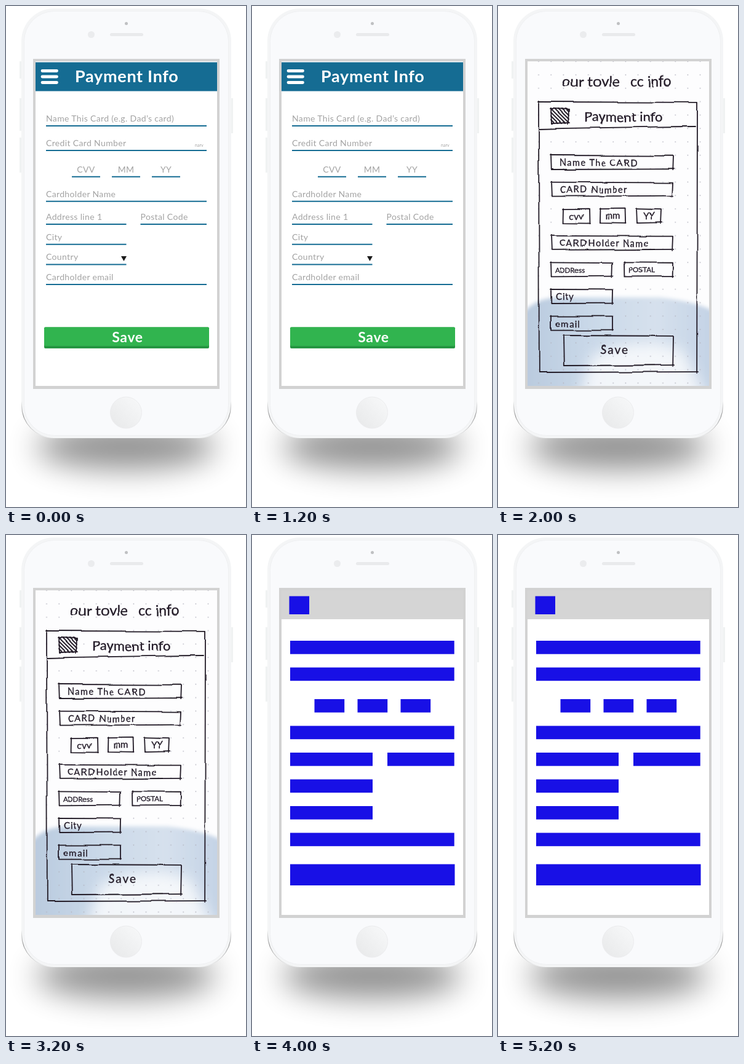
An HTML page that plays this animation: 390x815 px, repeating every 6000 ms.

```html
<!DOCTYPE html>
<html lang="en">
<head>
<meta charset="utf-8">
<title>Payment form: design, sketch, blocks</title>
<style>
  html, body { margin: 0; width: 100%; height: 100%; overflow: hidden; background: #fff; }
  svg { display: block; width: 390px; height: 815px; }
  text { font-family: Lato, sans-serif; }
  .label { font-size: 14px; letter-spacing: .35px; fill: #a3a3a3; }
  .bold { font-weight: 700; letter-spacing: .7px; fill: #fff; }
  .thirds { text-anchor: middle; }
  .ink { fill: none; stroke: #211a26; stroke-width: 1.8; stroke-linecap: round; stroke-linejoin: round; }
  .hand { fill: #211a26; stroke: #211a26; stroke-width: .3; font-size: 15px; }
  .hand.full { font-size: 14.5px; letter-spacing: 1.5px; }
  .hand.halves { font-size: 11.5px; }
  .hand.half { letter-spacing: 1px; }
  #sketch, #blocks { display: none; }
</style>
</head>
<body>
<svg viewBox="0 0 390 815">
  <defs>
    <filter id="soft" x="-50%" y="-150%" width="200%" height="400%"><feGaussianBlur stdDeviation="25"/></filter>
    <filter id="haze" x="-20%" y="-20%" width="140%" height="140%"><feGaussianBlur stdDeviation="3"/></filter>
    <filter id="glow" x="-40%" y="-60%" width="180%" height="220%"><feGaussianBlur stdDeviation="11"/></filter>
    <filter id="wobble" filterUnits="userSpaceOnUse" x="44" y="86" width="304" height="537">
      <feTurbulence type="fractalNoise" baseFrequency=".022" numOctaves="1" seed="4"/>
      <feDisplacementMap in="SourceGraphic" scale="5" xChannelSelector="R" yChannelSelector="G"/>
    </filter>
    <linearGradient id="button" x1="0" y1="1" x2="1" y2="0">
      <stop stop-color="#e7e8e9"/><stop offset="1" stop-color="#f8f9fa"/>
    </linearGradient>
    <linearGradient id="shade">
      <stop stop-color="#b9cade"/><stop offset=".35" stop-color="#c9d8e8"/>
      <stop offset=".7" stop-color="#d6e1ed"/><stop offset="1" stop-color="#c3d2e5"/>
    </linearGradient>
    <linearGradient id="edge" x1="0" y1="0" x2="0" y2="1">
      <stop stop-color="#888" stop-opacity="0"/><stop offset=".4" stop-color="#888"/>
      <stop offset="1" stop-color="#888" stop-opacity="0"/>
    </linearGradient>
    <pattern id="dots" patternUnits="userSpaceOnUse" x="56" y="101" width="20.2" height="21.8">
      <circle cx="10" cy="11" r=".9" fill="#b3b3be"/>
    </pattern>
    <clipPath id="screen"><rect x="48" y="90" width="295" height="528"/></clipPath>
  </defs>

  <g id="phone">
    <ellipse cx="195" cy="717" rx="146" ry="36" opacity=".44" filter="url(#soft)"/>
    <path d="M22 90h6v28h-6zM22 150h6v53h-6zM22 214h6v57h-6zM362 150h7v57h-7z" fill="#f0f2f2"/>
    <rect x="25" y="4" width="341" height="699" rx="53" fill="#f4f5f6"/>
    <rect x="29.500" y="8.500" width="332" height="690" rx="49" fill="#f9fafc" stroke="#eff0f2"/>
    <path d="M25.500 643v7a52 52 0 0 0 52 52.500h236a52 52 0 0 0 52-52.500v-7" fill="none" stroke="url(#edge)"/>
    <circle cx="138.500" cy="46.500" r="5.500" fill="#ebecee"/>
    <circle cx="195.500" cy="28.500" r="2.500" fill="#bfc0c2"/>
    <rect x="169" y="44" width="54" height="5" rx="2.500" fill="#e9eaec"/>
    <circle cx="195" cy="661.500" r="25.500" fill="url(#button)" stroke="#ececee"/>
    <rect x="44" y="86" width="303" height="537" fill="#d2d2d2"/>
    <rect x="48" y="90" width="295" height="528" fill="#fff"/>
  </g>

  <g id="design">
    <path d="M48 91.500h295v47h-295z" fill="#156c93"/>
    <path d="M59 105.500h23.500M59 115h23.500M59 124.500h23.500" stroke="#fff" stroke-width="4.800" stroke-linecap="round"/>
    <text class="bold" x="112" y="124" font-size="27">Payment Info</text>
    <path d="M187 407h9l-4.500 8z" fill="#1b1b1b"/>
    <rect x="62" y="522.500" width="268" height="34.500" rx="2" fill="#259641"/>
    <rect x="62" y="522.500" width="268" height="30.500" rx="2" fill="#31b44f"/>
    <text class="bold" x="197.500" y="547" font-size="23" text-anchor="middle">Save</text>
    <text x="307" y="229" font-size="7" fill="#a3a3a3">narv</text>
  </g>

  <g id="sketch" clip-path="url(#screen)">
    <rect x="48" y="90" width="295" height="528" fill="#fdfdfe"/>
    <path d="M40 630V500Q62 474 100 474H262Q318 480 350 496V630Z" fill="url(#shade)" filter="url(#haze)"/>
    <path d="M128 650L152 570Q220 535 300 560L345 650Z" fill="#fff" opacity=".75" filter="url(#glow)"/>
    <rect x="48" y="90" width="295" height="528" fill="url(#dots)"/>
    <g id="drawing" filter="url(#wobble)">
      <path class="ink" d="M67 200Q190 197 321 196"/>
      <text class="hand" x="104" y="131" style="font-size:24px">our tovle</text>
      <text class="hand" x="215" y="131" style="font-size:23px">cc info</text>
      <text class="hand" x="140" y="188" style="font-size:22px">Payment info</text>
      <text class="hand" x="166" y="565" style="font-size:19px" letter-spacing="2">Save</text>
    </g>
  </g>

  <g id="blocks">
    <path d="M48 90h295v47h-295z" fill="#d5d5d5"/>
  </g>
</svg>

<script>
const byId = id => document.getElementById(id);

function add(parent, tag, attrs, content = '') {
  const el = document.createElementNS('http://www.w3.org/2000/svg', tag);
  for (const name in attrs) el.setAttribute(name, attrs[name]);
  el.textContent = content;
  byId(parent).append(el);
}

// All three scenes share one form layout, each on its own grid.
const rows = ['full', 'full', 'thirds', 'full', 'halves', 'half', 'half', 'full'];

function cells(kind, { left, right, middle, second, first, step, size }) {
  if (kind === 'full') return [[left, right]];
  if (kind === 'half') return [[left, middle]];
  if (kind === 'halves') return [[left, middle], [second, right]];
  return [0, 1, 2].map(k => [first + k * step, first + k * step + size]);
}

function layOut(grid, rowCount, rowY, draw) {
  let index = 0;
  rows.slice(0, rowCount).forEach((kind, row) => {
    for (const [from, to] of cells(kind, grid)) draw(from, to, rowY(row), kind, index++);
  });
}

const labelX = (from, to, kind, inset) => kind === 'thirds' ? (from + to) / 2 : from + inset;

// Finished design: underlined fields, closer together below the address
const labels = ['Name This Card (e.g. Dad’s card)', 'Credit Card Number', 'CVV', 'MM', 'YY', 'Cardholder Name',
  'Address line 1', 'Postal Code', 'City', 'Country', 'Cardholder email'];
layOut(
  { left: 65, right: 326, middle: 195.5, second: 218.5, first: 107, step: 65, size: 46 }, 8,
  row => 195 + 40 * Math.min(row, 4) + 32.7 * Math.max(row - 4, 0) + (row >> 1 === 1 ? 2.8 : 0),
  (from, to, y, kind, i) => {
    add('design', 'text', { class: `label ${kind}`, x: labelX(from, to, kind, 0), y: y - 7 }, labels[i]);
    add('design', 'path', { d: `M${from} ${y}H${to}`, stroke: '#156c93', 'stroke-width': 2 });
  });

// Pen sketch: slightly crooked boxes
function penBox(l, t, r, b) {
  const lean = Math.sin(l + t);
  add('drawing', 'path', {
    class: 'ink',
    d: `M${l} ${t - 1}L${l + lean} ${b}L${r + 1} ${b - lean}M${l - 1} ${t}L${r} ${t + lean}L${r - lean} ${b + 1}`
  });
}

penBox(66, 156, 324, 596);
penBox(107, 536, 285, 585);
penBox(86, 167, 115, 191);
for (let d = -18; d < 28; d += 6) {
  const dx = Math.max(d, 0), dy = Math.max(-d, 0), run = Math.min(29 - dx, 24 - dy);
  add('drawing', 'path', { class: 'ink', d: `M${86 + dx} ${167 + dy}l${run} ${run}` });
}

const notes = ['Name The CARD', 'CARD Number', 'cvv', 'mm', 'YY', 'CARDHolder Name',
  'ADDRess', 'POSTAL', 'City', 'email'];
layOut(
  { left: 86, right: 284, middle: 186, second: 205, first: 107, step: 58.5, size: 41 }, 7,
  row => 243 + 43.6 * row,
  (from, to, y, kind, i) => {
    penBox(from, y, to, y + 23);
    const x = labelX(from, to, kind, kind === 'full' ? 14 : 7);
    add('drawing', 'text', { class: `hand ${kind}`, x, y: y + 17 }, notes[i]);
  });

// Solid blocks
const block = (l, t, r, b) =>
  add('blocks', 'rect', { x: l, y: t, width: r - l, height: b - t, fill: '#1810e6' });

block(60.5, 99.5, 93, 129);
block(62, 535.5, 329.5, 570);
layOut(
  { left: 62, right: 328.7, middle: 196, second: 220, first: 101.5, step: 70, size: 48.7 }, 8,
  row => 172 + 43.5 * row + (row > 1 ? 8 : 0),
  (from, to, y) => block(from, y, to, y + 21.7));

const scenes = ['design', 'sketch', 'blocks'].map(byId);
const start = performance.now();

function show() {
  const current = Math.floor((performance.now() - start) / 2000) % scenes.length;
  scenes.forEach((scene, i) => { scene.style.display = i === current ? 'inline' : 'none'; });
  requestAnimationFrame(show);
}
show();
</script>
</body>
</html>
```
